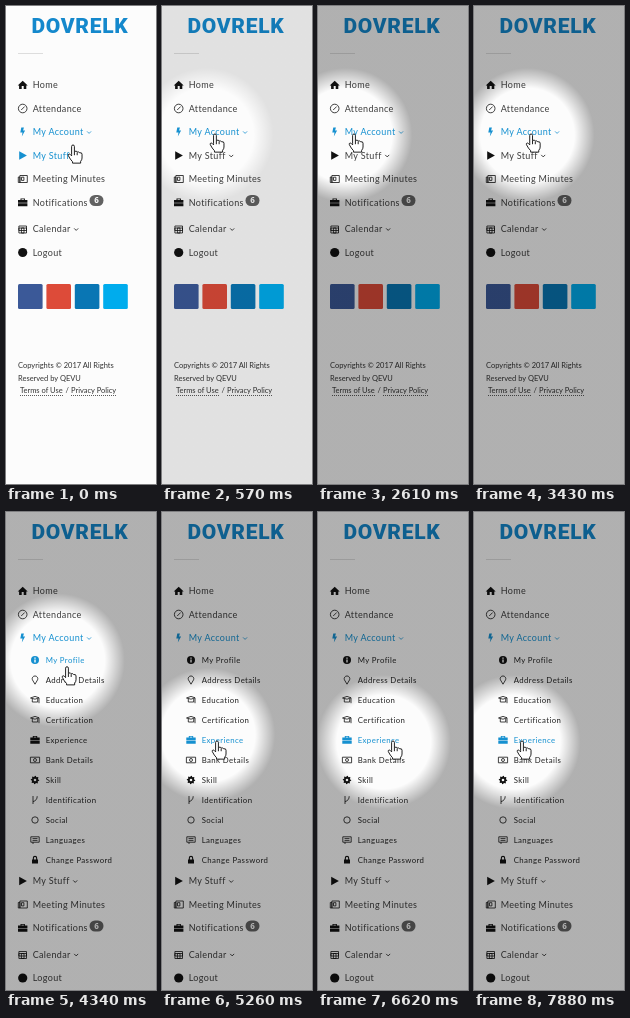
Write an HTML page that moves like this. It is 150x478 px and loops after 8 s.

```html
<!DOCTYPE html>
<html lang="en">
<head>
<meta charset="utf-8">
<title>Menu walkthrough</title>
<style>
  html, body { margin: 0; width: 100%; height: 100%; overflow: hidden; background: #fcfcfc; }
  svg { display: block; font-family: Lato, sans-serif; }
  .item { color: #111; }
  .item text { font-size: 9px; letter-spacing: .35px; fill: #3c3c3c; }
  .sub text { font-size: 7.8px; letter-spacing: .4px; fill: #222; }
  .item.on { color: #1590d0; }
  .item.on > text { fill: #1590d0; }
  .item .count { font: 700 8px "Open Sans", sans-serif; letter-spacing: 0; fill: #fff; }
  .solid { fill: currentColor; fill-rule: evenodd; }
  .line { fill: none; stroke: currentColor; stroke-width: .8; }
  .foot { font-size: 7.5px; fill: #333; }
  .logo { font: 900 21px Roboto, sans-serif; letter-spacing: .7px; fill: #1488cc; }
</style>
</head>
<body>
<svg width="150" height="478" viewBox="0 0 150 478">
  <defs>
    <radialGradient id="light" gradientUnits="userSpaceOnUse" r="67">
      <stop offset=".7" stop-opacity="0"/>
      <stop offset="1" stop-opacity=".3"/>
    </radialGradient>
    <clipPath id="drawer"><rect id="opening" y="138" width="150" height="0"/></clipPath>
  </defs>
  <rect width="150" height="478" fill="#fcfcfc"/>
  <text class="logo" x="74" y="27" text-anchor="middle">DOVRELK</text>
  <path d="M12 47.5H37" stroke="#ddd"/>
  <g id="top"></g>
  <g id="subs" clip-path="url(#drawer)"></g>
  <g id="lower">
    <g id="rest"></g>
    <g id="social"></g>
    <g class="foot">
      <text x="12" y="362">Copyrights © 2017 All Rights</text>
      <text x="12" y="374.5">Reserved by QEVU</text>
      <text x="14" y="387">Terms of Use</text>
      <text x="59.5" y="387">/</text>
      <text x="65" y="387">Privacy Policy</text>
      <path d="M14 389.5H57M65 389.5H111" stroke="#333" stroke-width=".8" stroke-dasharray="1 1"/>
    </g>
  </g>
  <rect id="shade" width="150" height="478" fill="url(#light)"/>
  <path id="hand" fill="#fff" stroke="#111" stroke-linejoin="round"
    d="M-1.5 10V1.5a1.5 1.5 0 0 1 3 0V7q2.5-1.2 3 .6q2-.8 2.6.8q2.6-.6 2.6 1.5V14q0 2-1.5 3.5V19.5H-.5V18Q-3 15.5-5 11.5q-.6-1.7 1-1.8q1 0 2.5 2zM1.5 7v4M4.5 8v3"/>
</svg>
<script>
const $ = id => document.getElementById(id);
const clamp = u => Math.max(0, Math.min(1, u));

// Icons are centred on 0,0
const box = (x, y, w, h) => `M${x} ${y}h${w}v${h}h${-w}z`;
const disc = r => `M${-r} 0a${r} ${r} 0 1 0 ${2 * r} 0a${r} ${r} 0 1 0 ${-2 * r} 0z`;
const cog = teeth => 'M' + Array.from({ length: teeth * 4 }, (_, i) => {
  const a = Math.PI * i / teeth / 2, r = i % 4 < 2 ? 4.2 : 3.2;
  return `${r * Math.cos(a)} ${r * Math.sin(a)}`;
}).join('L') + 'z';

const solid = {
  home: 'M-5 .5L0-4.2 5 .5H3.6V4H1V1H-1V4H-3.6V.5z',
  bolt: 'M-1.4-4.5H1.2L.4-1.6H2.4L-.9 4.6-.2.5H-2.4z',
  play: 'M-3.5-4.2L4.2 0-3.5 4.2z',
  bag: box(-4.7, -2.5, 9.4, 6.3) + box(-2.2, -4, 4.4, 1.5) + box(-1.2, -3.2, 2.4, .7) + box(-4.7, .3, 9.4, .5),
  dot: disc(4.6),
  info: disc(4) + box(-.7, -2.5, 1.4, 1.2) + box(-.7, -.6, 1.4, 3.1),
  gear: cog(8) + disc(1.3),
  lock: box(-3, -.5, 6, 4.1) + 'M-2.2-.5V-2a2.2 2.2 0 0 1 4.4 0V-.5H1.1V-2a1.1 1.1 0 0 0-2.2 0V-.5z'
};
const line = {
  dial: disc(4.3) + 'M-1.5 1.5L2-2',
  news: box(-2.8, -3.5, 7.4, 7) + box(-4.4, -2, 1.6, 5.5) + box(-1.2, -1.8, 2.4, 3.2),
  date: box(-3.8, -3, 7.6, 7) + box(-3.8, -1, 7.6, 2.5) + box(-1.3, -1, 2.6, 5),
  pin: 'M0 4.2L-2.6-.2a2.8 2.8 0 1 1 5.2 0z',
  cap: 'M-4.5-2L0-3.6 4-2.2 0-.8zM-2.7-1.2V2H2.7V-1.2M4-2.2V3.2',
  cash: box(-4.6, -2.8, 9.2, 5.6) + disc(1.5),
  fork: 'M-2 4V-4M2.2-3.8Q2.2.5-2 1.6',
  ring: disc(3.2),
  chat: box(-4.2, -3.2, 8.4, 5.4) + 'M-2.5-1.4h5M-2.5.4h5M-2 2.2V4'
};

function addItem(parent, icon, label, y, sub) {
  const [x, textX, drop] = sub ? [29, 39.7, 2.8] : [16.7, 26.7, 3.3];
  parent.insertAdjacentHTML('beforeend', `<g class="item ${sub ? 'sub' : ''}">
    <path class="${solid[icon] ? 'solid' : 'line'}" d="${solid[icon] || line[icon]}" transform="translate(${x} ${y})"/>
    <text x="${textX}" y="${y + drop}">${label}</text></g>`);
  return parent.lastElementChild;
}

// Extras sit right after the label
const labelEnd = g => 26.7 + g.querySelector('text').getComputedTextLength();
const chevron = (g, y) => g.insertAdjacentHTML('beforeend',
  `<path class="line" d="M${labelEnd(g) + 3.5} ${y - .6}l2 2 2-2"/>`);
const badge = (g, y) => g.insertAdjacentHTML('beforeend',
  `<rect x="83.5" y="${y - 7.5}" width="14" height="11" rx="5.5" fill="#626262"/>
   <text class="count" x="90.5" y="${y + .9}" text-anchor="middle">6</text>`);

'home Home,dial Attendance,bolt My Account,play My Stuff,news Meeting Minutes,bag Notifications,date Calendar,dot Logout'
  .split(',').forEach((entry, i) => {
    const [icon, ...words] = entry.split(' '), label = words.join(' ');
    const y = 79 + 23.5 * i + (i > 5 ? 3 : 0);
    const g = addItem($(i < 3 ? 'top' : 'rest'), icon, label, y);
    if (/My|Cal/.test(label)) chevron(g, y);
    if (icon === 'bag') badge(g, y);
  });

const rows = ('info My Profile,pin Address Details,cap Education,cap Certification,bag Experience,cash Bank Details,' +
  'gear Skill,fork Identification,ring Social,chat Languages,lock Change Password')
  .split(',').map((entry, i) => {
    const [icon, ...words] = entry.split(' ');
    return addItem($('subs'), icon, words.join(' '), 148 + 20 * i, true);
  });

$('social').innerHTML = ['#3b5998', '#dd4b39', '#0976b4', '#00aced'].map((c, i) =>
  `<rect x="${12 + 28.4 * i}" y="278" width="24.6" height="25" rx="1.5" fill="${c}"/>`).join('');

$('top').lastElementChild.classList.add('on');
const stuff = $('rest').firstElementChild;

// Sideways turning points of the pointer: [time, x]
const turns = [
  [20, 55], [1560, 48], [2610, 36], [3000, 80], [3550, 54], [4340, 61], [5260, 55], [6620, 75], [7880, 48], [8000, 48]
];

function tipAt(t) {
  if (t < 20) return [67, 139];
  const i = turns.findIndex(k => k[0] > t), [t0, x0] = turns[i - 1], [t1, x1] = turns[i];
  const u = (t - t0) / (t1 - t0);
  return [x0 + (x1 - x0) * u * u * (3 - 2 * u), 128 + 101 * clamp((t - 4010) / 1250)];
}

function draw(now) {
  const t = now % 8000;
  const [x, y] = tipAt(t), [lightX, lightY] = tipAt(t - 90);
  // The submenu opens in two jumps
  const open = clamp(Math.floor((t - 3710) / 150) / 2), slide = 219.5 * open;
  const row = open === 1 ? Math.floor((y - 138) / 20) : -1;

  $('hand').setAttribute('transform', `translate(${x} ${y}) scale(.93)`);
  $('light').setAttribute('cx', lightX - 9);
  $('light').setAttribute('cy', lightY + 1);
  $('shade').setAttribute('opacity', clamp((t - 200) / 1040));
  $('opening').setAttribute('height', slide);
  $('lower').setAttribute('transform', `translate(0 ${slide})`);
  stuff.classList.toggle('on', !open && y > 138);
  rows.forEach((r, i) => r.classList.toggle('on', i === row));
  requestAnimationFrame(() => draw(performance.now() - start));
}
const start = performance.now();
draw(0);
</script>
</body>
</html>
```
